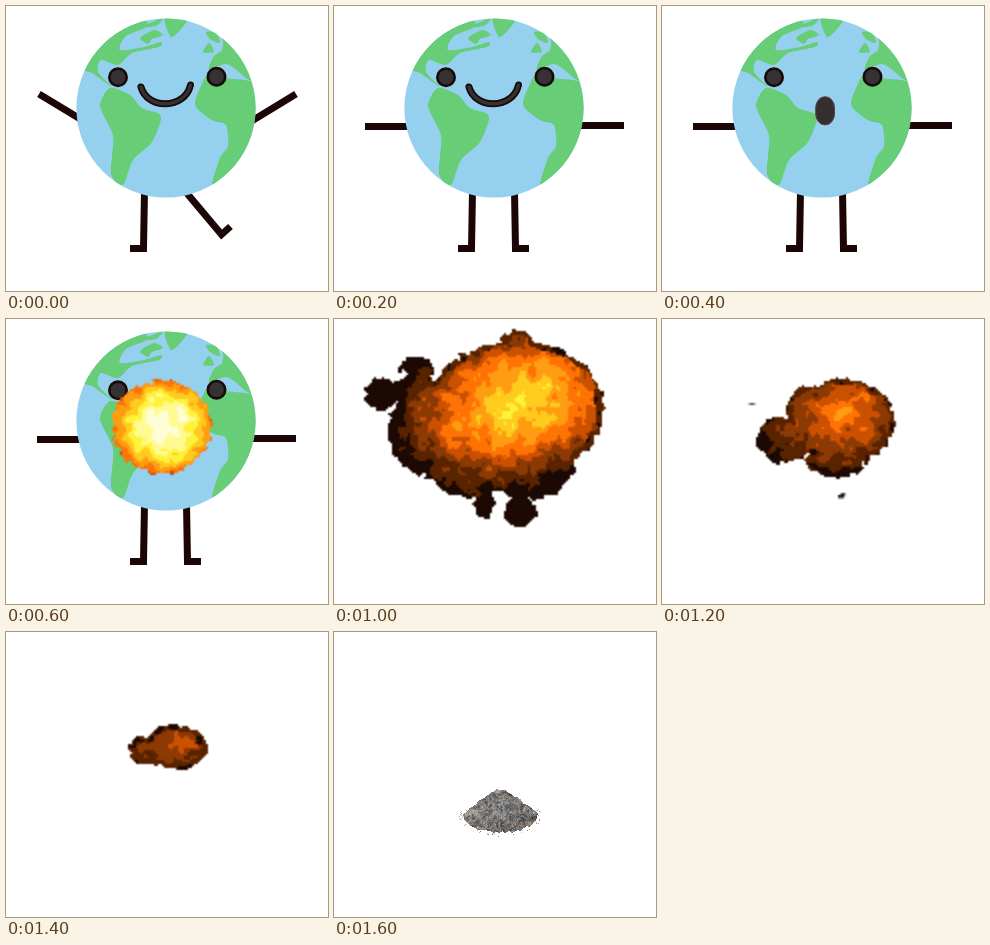
An HTML page with a canvas that plays this animation: 322 px wide and 285 px high, repeating every 3.6 s.

```html
<!DOCTYPE html>
<html lang="en">
<head>
<meta charset="utf-8">
<title>Earth to ashes</title>
<style>
html, body { margin: 0; width: 100%; height: 100%; overflow: hidden; background: #fff; }
svg, canvas { position: absolute; left: 0; top: 0; display: block; }
svg { width: 322px; height: 285px; }
.blast { width: 322px; height: 286px; }
.part { opacity: 0; animation: 3.6s step-end infinite; }

#earth { animation-name: earth; }
#wave { animation-name: wave; }
#stand { animation-name: stand; }
#smile { animation-name: smile; }
#gasp { animation-name: gasp; }
#spark { animation-name: spark; }
#burst { animation-name: burst; }
#cloud { animation-name: cloud; }
#smoke { animation-name: smoke; }
#wisp { animation-name: wisp; }
#ash { animation-name: ash; }

@keyframes earth { 0% { opacity: 1 } 27.7778% { opacity: 0 } }
@keyframes wave { 0% { opacity: 1 } 5.5556% { opacity: 0 } }
@keyframes stand { 5.5556% { opacity: 1 } 27.7778% { opacity: 0 } }
@keyframes smile { 0% { opacity: 1 } 11.1111% { opacity: 0 } }
@keyframes gasp { 11.1111% { opacity: 1 } 27.7778% { opacity: 0 } }
@keyframes spark { 16.6667% { opacity: 1 } 22.2222% { opacity: 0 } }
@keyframes burst { 22.2222% { opacity: 1 } 27.7778% { opacity: 0 } }
@keyframes cloud { 27.7778% { opacity: 1 } 33.3333% { opacity: 0 } }
@keyframes smoke { 33.3333% { opacity: 1 } 38.8889% { opacity: 0 } }
@keyframes wisp { 38.8889% { opacity: 1 } 44.4444% { opacity: 0 } }
@keyframes ash { 44.4444% { opacity: 1 } 100% { opacity: 1 } }

.limb { fill: none; stroke: #1b0605; stroke-width: 7; }
.eye { fill: #363132; stroke: #170a07; stroke-width: 2.6; }
</style>
</head>
<body>
<svg viewBox="0 0 322 285">
  <clipPath id="globe"><circle cx="160" cy="102" r="89.6"/></clipPath>
  <g id="wave" class="part limb">
    <path d="M33 88L76 114M290 88L244 116M138.5 185L137.5 242.5H124M179 185L215.5 228.5L224.5 220.5"/>
  </g>
  <g id="stand" class="part limb">
    <path d="M31 120.5H76M244 119.5H290M138.5 185L137.5 242.5H124M180.5 185L181.5 242.5H195"/>
  </g>
  <g id="earth" class="part">
    <circle cx="160" cy="102" r="89.6" fill="#95d1ef"/>
    <path id="land" fill="#67cd77" clip-path="url(#globe)"/>
    <circle class="eye" cx="112" cy="71.3" r="8.7"/>
    <circle class="eye" cx="210.5" cy="70.7" r="8.7"/>
    <g id="smile" class="part" fill="none" stroke-linecap="round">
      <path d="M135 81C141 103.7 179 103.7 184.5 79" stroke="#170a07" stroke-width="7"/>
      <path d="M135 81C141 103.7 179 103.7 184.5 79" stroke="#363132" stroke-width="3.4"/>
    </g>
    <rect id="gasp" class="part" x="153.7" y="90.7" width="18.8" height="28.2" rx="9.2" ry="11" fill="#352e2e" stroke="#5e4637"/>
  </g>
</svg>
<canvas id="spark" class="part blast" width="161" height="143"></canvas>
<canvas id="burst" class="part blast" width="161" height="143"></canvas>
<canvas id="cloud" class="part blast" width="161" height="143"></canvas>
<canvas id="smoke" class="part blast" width="161" height="143"></canvas>
<canvas id="wisp" class="part blast" width="161" height="143"></canvas>
<canvas id="ash" class="part" width="322" height="285"></canvas>
<script>
const FIRE = ['#fffdd8', '#fffb90', '#fff23a', '#ffcb1e', '#ff9d12', '#ff7304', '#cb5000', '#8c3904', '#5a2300', '#1c0904'];
const ctxOf = id => document.getElementById(id).getContext('2d');
const clamp = (v, lo, hi) => Math.max(lo, Math.min(hi, v));

// Closed smooth curve through a few key points
function coast(text) {
  const pts = text.split(' ').map(p => p.split(',').map(Number));
  const at = i => pts[(i + pts.length) % pts.length];
  const handle = (i, sign) => at(i).map((v, k) => v + sign * (at(i + 1)[k] - at(i - 1)[k]) / 8);
  return `M${pts[0]}` + pts.map((p, i) => `C${handle(i, 1)} ${handle(i + 1, -1)} ${at(i + 1)}`).join('') + 'Z';
}

const LAND = {
  northAmerica: '70,60 95,25 130,8 142,20 120,30 114,44 138,41 155,36 153,41 126,47 112,59 95,54 92,66 106,81 86,67',
  labrador: '134,32 148,24 157,29 146,33 142,38',
  arctic: '135,21 157,12 150,20',
  greenland: '159,12 182,11 176,22 165,31',
  britain: '197,46 203,37 208,46',
  norway: '200,26 210,27 214,37 204,33',
  europe: '204,14 255,25 261,76 243,74 228,62 219,58 203,63 208,50 216,44 216,30',
  africa: '189,98 202,68 218,72 244,75 260,85 245,140 207,180 214,152 222,140 220,119 206,114',
  southAmerica: '94,100 104,82 124,89 136,102 155,110 146,136 127,154 117,179 105,168 107,130'
};
document.getElementById('land').setAttribute('d', Object.values(LAND).map(coast).join(''));

function hash(x, y, s) {
  let h = Math.imul(x, 374761393) ^ Math.imul(y, 668265263) ^ Math.imul(s, 982451653);
  h = Math.imul(h ^ (h >>> 13), 1274126177);
  return ((h ^ (h >>> 16)) >>> 0) / 4294967296;
}

// Smooth value noise in -1..1
function noise(x, y, s) {
  const i = Math.floor(x), j = Math.floor(y);
  const ease = t => t * t * (3 - 2 * t);
  const u = ease(x - i), v = ease(y - j);
  const a = hash(i, j, s), b = hash(i + 1, j, s);
  const c = hash(i, j + 1, s), d = hash(i + 1, j + 1, s);
  return 2 * (a + (b - a) * u + (c - a + (a - b - c + d) * u) * v) - 1;
}

// 0 at the centre of an ellipse, 1 on its edge
function spread(x, y, [cx, cy, rx, ry, tilt = 0]) {
  const dx = x - cx, dy = y - cy, c = Math.cos(tilt), s = Math.sin(tilt);
  return Math.hypot((dx * c + dy * s) / rx, (dy * c - dx * s) / ry);
}

// Lobes are joined ellipses; the colour cools away from the hot ellipse and chars at the rim
function blast(id, { lobes, hot, base, gain, power = 1, rim = 4, seed }) {
  const ctx = ctxOf(id);
  for (let y = 1; y < 286; y += 2) {
    for (let x = 1; x < 322; x += 2) {
      const depth = Math.max(...lobes.map(l => (1 - spread(x, y, l)) * Math.min(l[2], l[3])));
      const grain = noise(x / 5, y / 5, seed);
      if (depth + 3 * grain < 0) continue;
      const patch = noise(x / 11, y / 11, seed + 1);
      let level = base + gain * spread(x, y, hot) ** power + 0.8 * patch + 0.6 * noise(x / 5, y / 5, seed + 2);
      if (depth + 4 * patch < rim) level = Math.max(level, 8.6 + 0.7 * grain);
      ctx.fillStyle = FIRE[clamp(Math.floor(level), 0, 9)];
      ctx.fillRect((x - 1) / 2, (y - 1) / 2, 1, 1);
    }
  }
  return ctx;
}

blast('spark', {
  lobes: [[156, 108, 50, 46]], hot: [157, 107, 51, 47],
  base: 0.4, gain: 5.2, power: 2, rim: -9, seed: 11
});

const burst = blast('burst', {
  lobes: [[160, 101, 78, 61], [97, 77, 27, 20], [103, 118, 25, 32], [166, 164, 24, 18]],
  hot: [163, 98, 84, 60, -0.35],
  base: 0.6, gain: 5.7, power: 2.1, rim: 1, seed: 23
});
burst.fillStyle = '#fff';
burst.fillRect(37, 41.5, 4.5, 4.5);
burst.fillRect(89, 84, 4, 2.5);

blast('cloud', {
  lobes: [
    [182, 90, 88, 68], [100, 112, 46, 46], [195, 140, 46, 41], [138, 152, 38, 27],
    [47, 75, 16, 17], [82, 49, 17, 10], [81, 72, 23, 18], [185, 23, 18, 11],
    [150, 184, 9, 17], [187, 192, 16, 16]
  ],
  hot: [185, 85, 82, 54, -0.3],
  base: 2.7, gain: 3.9, power: 1.3, seed: 37
});

const smoke = blast('smoke', {
  lobes: [[182, 103, 50, 43], [123, 121, 28, 23], [150, 92, 25, 27], [174, 143, 29, 16]],
  hot: [182, 93, 50, 38, -0.3],
  base: 5.1, gain: 2.6, seed: 53
});
smoke.fillStyle = '#5c5148';
smoke.fillRect(43.5, 42, 3, 1);
smoke.fillStyle = '#1c0904';
smoke.fillRect(88, 88, 3, 1.5);
smoke.fillRect(89.5, 87, 2, 1.5);

blast('wisp', {
  lobes: [[170, 115, 33, 21], [145, 119, 24, 15]], hot: [169, 113, 34, 22, -0.2],
  base: 6.3, gain: 1.8, seed: 71
});

function ash() {
  const ctx = ctxOf('ash');
  const dot = (x, y, tone, warm) => {
    const v = Math.round(clamp(tone, 34, 215)), w = Math.round(warm);
    ctx.fillStyle = `rgb(${v + w},${v},${v - w})`;
    ctx.fillRect(x, y, 1, 1);
  };
  for (let x = 129; x <= 203; x++) {
    const u = (x - 166) / 37;
    const top = 156.5 + 25 * Math.abs(u) ** 1.2 + 1.2 * noise(x / 3, 0, 5);
    const foot = 183 + 17 * Math.sqrt(Math.max(0, 1 - u * u)) + 1.2 * noise(x / 3, 9, 6);
    for (let y = Math.round(top); y < foot; y++) {
      const tone = 128 - 16 * (y - 157) / 44 - 10 * u + 32 * noise(x / 2.2, y / 2, 7) + 18 * noise(x / 6, y / 5, 8) + 50 * (hash(x, y, 9) - 0.5);
      dot(x, y, tone, 3 + 7 * noise(x / 4, y / 4, 10));
    }
  }
  // Crumbs around the foot
  for (let i = 0; i < 45; i++) {
    const a = Math.PI * (1.3 * hash(i, 1, 3) - 0.15), r = 1 + 0.17 * hash(i, 2, 3);
    dot(Math.round(166 + 36 * r * Math.cos(a)), Math.round(185 + 16 * r * Math.sin(a)), 130 + 80 * hash(i, 3, 3), 8);
  }
}
ash();
</script>
</body>
</html>
```
